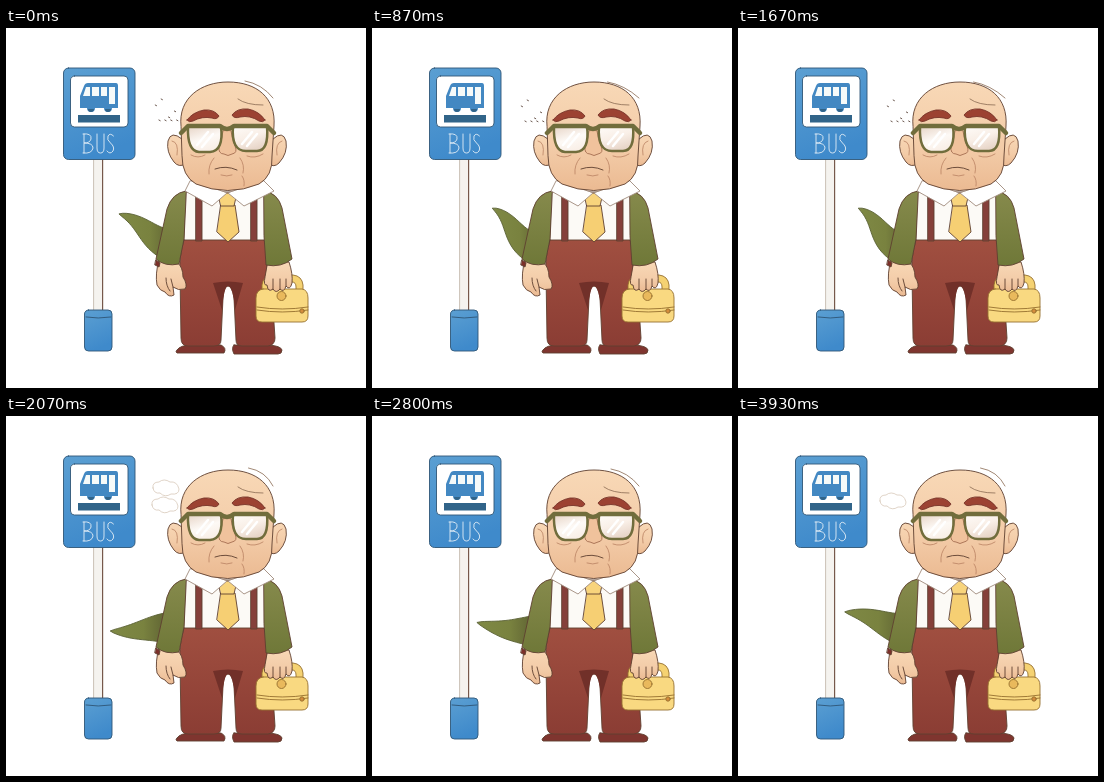
Write an HTML page that moves like this. It is 360 by 360 pixels and loops after 4070 ms.

```html
<!DOCTYPE html>
<html lang="en">
<head>
<meta charset="utf-8">
<title>Waiting for the bus</title>
<style>
html, body { margin: 0; width: 100%; height: 100%; overflow: hidden; background: #fff; }
svg { display: block; width: 100vw; height: 100vh; }
.line { fill: none; }
</style>
</head>
<body>
<svg viewBox="0 0 360 360" stroke="#5f4030" stroke-width=".9" stroke-linecap="round" stroke-linejoin="round">
<defs>
  <linearGradient id="blue" x2=".3" y2="1"><stop stop-color="#5b9fd2"/><stop offset="1" stop-color="#3f8acb"/></linearGradient>
  <linearGradient id="skin" x2="0" y2="1"><stop stop-color="#f8d8b6"/><stop offset=".6" stop-color="#f3cca8"/><stop offset="1" stop-color="#ebba92"/></linearGradient>
  <linearGradient id="green" x2="0" y2="1"><stop stop-color="#868a4c"/><stop offset="1" stop-color="#6f7838"/></linearGradient>
  <linearGradient id="tailFill"><stop stop-color="#7f8945"/><stop offset=".6" stop-color="#79823f"/><stop offset="1" stop-color="#616534"/></linearGradient>
  <linearGradient id="trousers" x2="0" y2="1"><stop stop-color="#a04f40"/><stop offset="1" stop-color="#8b3d34"/></linearGradient>
  <linearGradient id="glass" x2="1" y2="1"><stop stop-color="#e6d3c5"/><stop offset=".35" stop-color="#fdf9f5"/><stop offset=".6" stop-color="#f9efe7"/><stop offset="1" stop-color="#dfc9ba"/></linearGradient>
</defs>

<!-- bus stop -->
<g stroke="#2f5676">
  <rect x="88" y="130" width="9" height="154" fill="#f5f3ef" stroke="#c5b9ad"/>
  <path d="M96.500 132V283" stroke="#6a4a3c"/>
  <rect x="78.500" y="282" width="27.500" height="41" rx="4" fill="url(#blue)"/>
  <path class="line" d="M80 289Q92 291 105 289"/>
  <rect x="57.500" y="40" width="71.500" height="91.500" rx="5" fill="url(#blue)"/>
  <rect x="64.500" y="48" width="57.500" height="51" rx="4" fill="#fff"/>
</g>
<g stroke="none">
  <path d="M82 55H110Q112 55 112 58V80H106A4 4 0 0 1 98 80H89A4 4 0 0 1 81 80H74V68L78 58Q79 55 82 55Z" fill="#4388c2"/>
  <path d="M80 59H84V68H77ZM86 59H93V68H86ZM95 59H101V68H95ZM103 59H109V76H103Z" fill="#f6faf9"/>
  <path d="M72 87H114V94.500H72ZM82 81a3 3 0 0 0 6 0ZM99 81a3 3 0 0 0 6 0Z" fill="#316489"/>
</g>
<!-- hand lettering -->
<path aria-label="BUS" role="img" class="line" d="M78 106V125M77 106Q86 105 85 111Q84 115 78 115Q87 115 87 120Q86 126 77 125M91 106V120Q91 125 94.500 125Q98 125 98 120V106M107.500 108Q104 104.500 102 108Q100.500 112 104.500 115Q109 119 107 123Q104 127 101 123" stroke="#e2eef6"/>

<path id="tail" fill="url(#tailFill)" stroke="#5b6136"/>

<!-- shirt, trousers, shoes -->
<path d="M180 164H262L259 216H178Z" fill="#fcfaf6"/>
<path d="M171 322Q174 317 186 317H215Q221 320 218 325H171Q169 324 171 322ZM228 317H263Q275 318 276 322Q276 326 272 326H228Q225 320 228 317Z" fill="#7f352f"/>
<path d="M178 212H258Q265 230 265 250L269 310Q269 317 262 318H236Q230 318 230 312L228 270Q226 258 222 258Q218 258 217 270L215 312Q215 318 208 318H182Q175 318 175 310L174 245Q173 228 178 212Z" fill="url(#trousers)"/>
<path d="M207 255Q222 252 237 255L229 282Q227 258 222 258Q218 258 216 282Z" fill="#713029" stroke="none"/>
<path d="M190 162H196V213H190ZM245 162H251V213H245Z" fill="#85403a"/>
<path d="M215 177H229L233 204L222 214L211 204Z" fill="#f6cf73"/>
<path d="M212 165H231L228 178H215Z" fill="#f8d47c"/>

<!-- arms and bag -->
<path d="M153 232Q149 246 151 257Q154 263 159 264Q163 270 168 267L167 259Q172 263 179 261Q182 257 177 249Q177 239 171 234Z" fill="url(#skin)"/>
<path class="line" d="M160 250Q160 258 164 263M167 259L165 251"/>
<path d="M150 232L154 235L153 239L149 237Z" fill="#7c302a"/>
<path d="M180 163Q166 165 161 181L150 231Q159 239 173 236L178 211Z" fill="url(#green)"/>
<g stroke="#96702f">
  <path d="M256 264V257Q257 248 266 247H287Q296 248 297 257V264H290V259Q290 254 286 254H268Q263 254 263 259V264Z" fill="#f5d272"/>
  <path d="M257 261H296Q302 262 302 270V288Q302 294 296 294H256Q250 294 250 288V270Q250 262 257 261Z" fill="#f9d981"/>
  <path class="line" d="M251 279Q276 283 302 279M251 282Q276 286 302 282"/>
  <circle cx="275.500" cy="268" r="4.500" fill="#e9b95c"/>
  <circle cx="296" cy="283" r="2.200" fill="#d48c3c"/>
</g>
<path d="M262 234H283Q287 246 286 255Q284 263 280 258Q278 265 274 261Q270 266 267 261Q262 265 261 257Q257 258 259 249Z" fill="url(#skin)"/>
<path class="line" d="M267 261V251M274 261V251M280 258V251"/>
<path d="M258 163Q272 165 276 180L286 231Q275 240 260 237L258 208Z" fill="url(#green)"/>
<path d="M184 153L179 163L206 178L221 165ZM258 153L268 163L238 178L222 165Z" fill="#fff" stroke="#a08b7c"/>

<!-- head -->
<path d="M176 111Q165 102 162 113Q160 124 168 134Q173 140 179 136ZM267 111Q277 102 280 113Q282 125 273 135Q268 140 263 136Z" fill="url(#skin)"/>
<path d="M175 98C172 70 195 54 222 54C251 54 270 70 268 98L266 128Q267 148 253 156Q222 169 190 156Q176 148 176 128Z" fill="url(#skin)"/>
<path d="M181 92Q187 84 198 82Q208 81 213 88Q211 92 206 90Q196 88 187 93Q183 95 181 92ZM259 92Q253 83 242 81Q231 80 226 87Q228 91 234 89Q244 87 253 93Q257 95 259 92Z" fill="#9c4232" stroke="#78352a"/>
<path class="line" d="M166 113Q173 114 171 127M276 113Q269 115 271 127M215 147Q221 149 226 147M208 130Q202 137 203 146M234 130Q239 137 237 145M236 148Q239 152 238 158M185 127Q192 131 199 127M241 128Q249 131 257 126" stroke="#b98262" stroke-width=".8"/>
<path class="line" d="M209 141Q220 137 231 142"/>
<path d="M217 103Q216 112 213 118Q212 126 218 126Q222 129 226 126Q232 125 229 118Q226 111 225 103Z" fill="#f0c29c" stroke="#a56f52"/>
<g stroke="#716d3c">
  <path d="M182 98H215Q218 123 204 124H193Q181 123 182 98ZM227 98H261Q263 123 251 123H240Q225 123 227 98Z" fill="url(#glass)" stroke-width="2.500"/>
  <path class="line" d="M175 105L182 98H214Q221 104 228 98H261L268 105" stroke-width="4.500"/>
</g>
<path d="M191 117L202 104M196 119L207 106M236 116L246 104M241 118L251 106" stroke="#fff" stroke-width="2.500"/>

<path id="hair" class="line" stroke="#8a6a52" stroke-width=".8"/>
<g id="steam"></g>
</svg>

<script>
const LOOP = 4070, STEP = 200 / 3, CYCLE = 12, LAST = 59;
const el = id => document.getElementById(id);
const wave = (phase, peak) => Math.cos((phase - peak) * 2 * Math.PI / CYCLE);

// A tapering spine whose bend travels from root to tip.
function tailPath(phase) {
  const joints = 16, length = 55, upper = [], lower = [];
  let x = 159, y = 215 + 6 * wave(phase, 3);
  for (let i = 0; i <= joints; i++) {
    const s = i / joints, arch = Math.sin(Math.PI * s);
    const degrees = 13 + 12 * arch + (15 + 24 * arch) * wave(phase, 1.5 + 1.5 * s);
    const a = degrees * Math.PI / 180, half = 15 * (1 - s) ** .8;
    upper.push([x + half * Math.sin(a), y - half * Math.cos(a)]);
    lower.unshift([x - half * Math.sin(a), y + half * Math.cos(a)]);
    x -= length / joints * Math.cos(a);
    y -= length / joints * Math.sin(a);
  }
  return `M${upper.concat(lower).join('L')}Z`;
}

function hairPath(phase) {
  const x = 239 - 7 * wave(phase, 3), y = 53 + 2 * wave(phase, 3);
  return `M${x} ${y}Q${x + 17} ${y + 3} 267 70M232 71Q240 77 257 77`;
}

const cloud = (x, y) => `<path transform="translate(${x} ${y})" fill="#fff" stroke="#d8c9ba" stroke-width=".8"
  d="M-13 0Q-14 -6 -7 -6Q-2 -10 4 -6Q11 -7 13 1Q13 7 5 6Q-1 10 -6 5Q-12 6 -13 0Z"/>`;

function specks(phase) {
  let marks = '';
  for (let i = 1; i < 9; i++) {
    const x = 147 + 25 * (i * .618 % 1), y = 92 - 3 * i * (i % 2) + phase;
    marks += `M${x} ${y}l1.300 .7`;
  }
  return `<path d="${marks}" stroke="#5b463b"/>`;
}

// Puffs leave the ear, drift off and break into specks.
function steam(phase) {
  const age = phase - 7;
  if (age < -3) return specks(phase);
  if (age < 0) return '';
  return (age < 4 ? cloud(160 - age, 72 - age) : '') + cloud(159 - age, 89 - age);
}

let shown = -1;
function draw(time) {
  const step = Math.min(LAST, Math.floor((time % LOOP + 3.4) / STEP));
  if (step === shown) return;
  shown = step;
  const phase = step % CYCLE;
  el('tail').setAttribute('d', tailPath(phase));
  el('hair').setAttribute('d', hairPath(phase));
  el('steam').innerHTML = steam(phase);
}

const start = performance.now();
function tick() {
  draw(performance.now() - start);
  requestAnimationFrame(tick);
}
tick();
</script>
</body>
</html>
```
